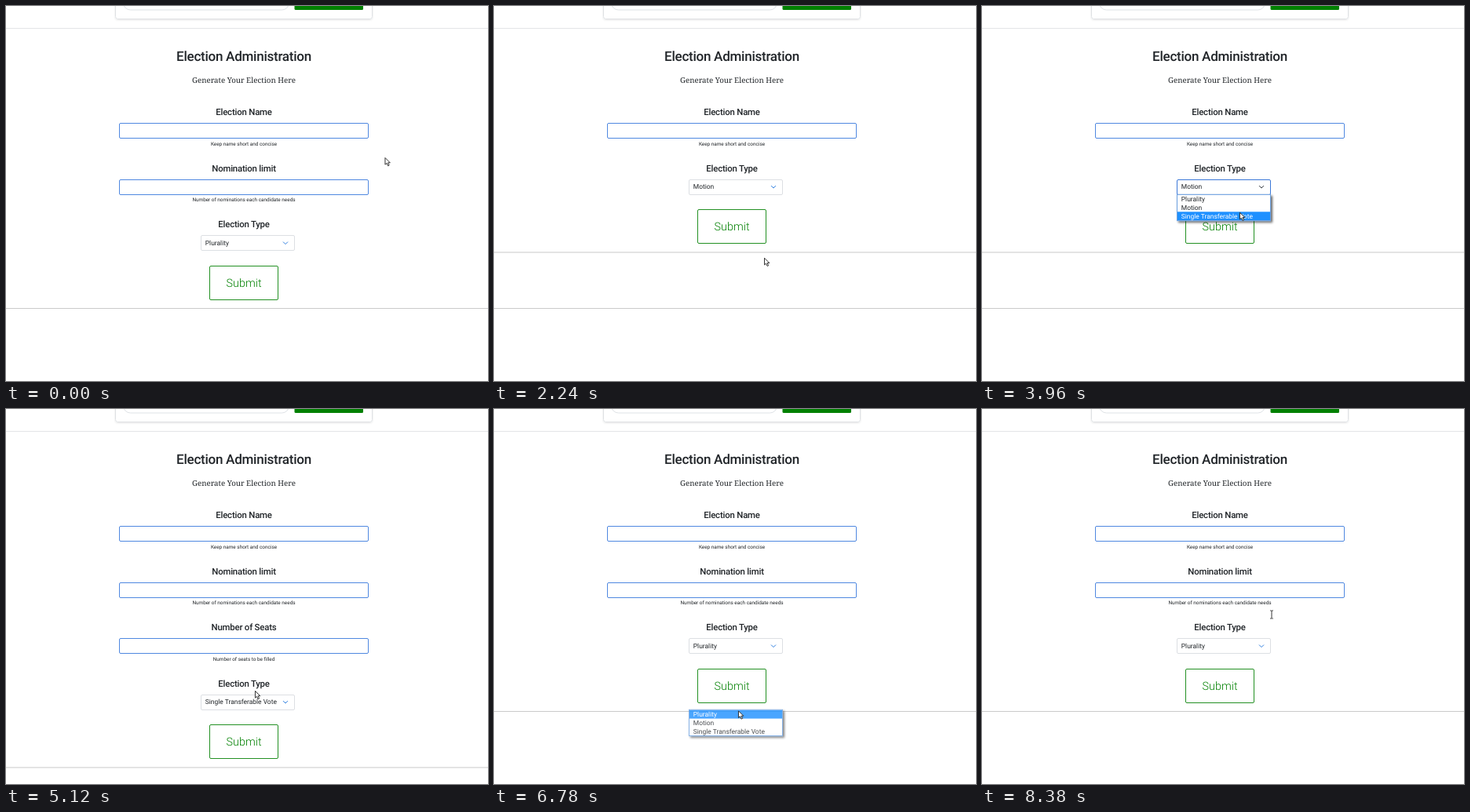
These frames come from a looping animation (614x478 px, 8400 ms). An HTML page:

```html
<!DOCTYPE html>
<html lang="en">
<head>
<meta charset="utf-8">
<title>Election Administration</title>
<style>
  html, body { margin: 0; width: 100%; height: 100%; overflow: hidden; background: #fff; }
  svg { display: block; width: 614px; height: 478px; }
  text { font-family: Roboto, sans-serif; fill: #212529; text-anchor: middle; text-rendering: geometricPrecision; }
  .title { font-size: 17.1px; font-weight: 500; letter-spacing: -.3px; }
  .lead { font: 9.75px "Noto Serif", serif; }
  .label { font-size: 11.4px; font-weight: 500; letter-spacing: -.2px; }
  .help { font-size: 6.4px; }
  .option { font-size: 8.45px; text-anchor: start; }
  .submit { font-size: 14.4px; font-weight: 300; }
  .box { fill: #fff; stroke: #4f88e0; }
  .cursor { fill: #fff; stroke: #222; stroke-linejoin: round; }
</style>
</head>
<body>
<svg id="stage" viewBox="0 0 614 478"></svg>
<script>
const LOOP = 8400, MID = 303, STEP = 71.5, ROW = 10.7, FADE = 160;
const TYPES = ['Plurality', 'Motion', 'Single Transferable Vote'];
const FIELDS = [
  ['Election Name', 'Keep name short and concise'],
  ['Nomination limit', 'Number of nominations each candidate needs'],
  ['Number of Seats', 'Number of seats to be filled']
];
const FIELD_COUNT = [2, 1, 3];

// Each round: go to the select, open it, pick the next type, then rest
const FIRST_STOP = [356, 278];
const ROUNDS = [
  { start: 1140, rest: [330, 279] },
  { start: 3060, rest: [317, 359] },
  { start: 5800, rest: [369, 262] }
].map(({ start, rest }, type) => ({
  type, start, rest, next: (type + 1) % 3, open: start + 450, pick: start + 920
}));

const stage = document.getElementById('stage');
const clamp = (v, a, b) => Math.max(a, Math.min(b, v));
const snap = v => Math.floor(v) + .5;
const selectY = type => 158.8 + FIELD_COUNT[type] * STEP;
const fieldY = i => 159 + i * STEP;
const typeAt = t => ROUNDS.reduce((type, r) => t >= r.pick ? r.next : type, 0);

const rect = (x, y, w, h, attrs = '') => `<rect x="${x}" y="${y}" width="${w}" height="${h}" ${attrs}/>`;
const text = (cls, x, y, str, attrs = '') => `<text class="${cls}" x="${x}" y="${y}" ${attrs}>${str}</text>`;
const rule = (y, color) => rect(0, y, 614, 1, `fill="${color}"`);

function pointerAt(t) {
  if (t < 80) return [482.5, 193];
  if (t < 360) return null;
  let at = FIRST_STOP;
  const move = (from, to, stop) => {
    const p = clamp((t - from) / (to - from), 0, 1), e = p * p * (3 - 2 * p);
    at = at.map((v, i) => v + (stop[i] - v) * e);
  };
  for (const r of ROUNDS) {
    const x = 345 - 17 * r.type, y = selectY(r.type);
    move(r.start, r.start + 300, [x, y - 5]);
    move(r.open, r.open + 370, [x, y + 10 + (r.next + .1) * ROW]);
    move(r.pick + 80, r.pick + 740, r.rest);
  }
  return at;
}

function targetAt(t) {
  const at = pointerAt(t);
  if (!at || ROUNDS.some(r => t >= r.open && t < r.pick + 40)) return '';
  const [x, y] = at, type = typeAt(t), c = selectY(type);
  const within = (halfW, top, bottom) => Math.abs(x - MID) < halfW && y > top && y < bottom;
  if (within(60, c - 9, c + 9)) return 'select';
  if (within(44, c + 29, c + 73)) return 'submit';
  const onField = FIELDS.slice(0, FIELD_COUNT[type]).some((f, i) => within(158, fieldY(i) - 10, fieldY(i) + 35));
  return onField ? 'text' : '';
}

function submitFill(t) {
  let n = 0;
  for (let k = 0; k < 10; k++) n += targetAt(t - k * 15) === 'submit';
  return n / 10;
}

function header() {
  return rect(139.5, -20, 327, 36.5, 'rx="3" fill="#fff" stroke="#dfe1e4" filter="url(#soft)"') +
    rect(149.5, -16, 211, 21, 'rx="9" fill="#fff" stroke="#dee2e6"') +
    rect(367.5, -20, 87.5, 25, 'rx="1.5" fill="#008000"') +
    rule(28, '#e3e5e7') +
    text('title', MID, 69.6, 'Election Administration') +
    text('lead', MID, 98.4, 'Generate Your Election Here');
}

function field([label, help], i) {
  const y = fieldY(i);
  return text('label', MID, y - 19.7, label) +
    rect(144.5, snap(y - 9.5), 317, 19, 'rx="1.5" class="box"') +
    text('help', MID, y + 18.8, help);
}

function select(c, type, hover, open) {
  const border = open ? '#3b78d8' : hover ? '#a5a8ac' : '#dcdfe3';
  const arrow = open || hover ? '#343a40' : '#2f7fe0';
  return text('label', MID, c - 19.6, 'Election Type') +
    rect(248.5, snap(c - 9.2), 119, 19, `rx="1.5" fill="#fff" stroke="${border}"`) +
    text('option', 253.8, c + 2.9, TYPES[type]) +
    `<path d="M353 ${c - 1.2}l3 3 3-3" fill="none" stroke="${arrow}"/>`;
}

function submit(c, fill) {
  const mix = (a, b) => Math.round(a + (b - a) * fill);
  return rect(259.5, snap(c - 21.5), 87, 43, `rx="1.5" stroke="#239023" fill="rgb(${mix(255, 0)},${mix(255, 128)},${mix(255, 0)})"`) +
    text('submit', MID, c + 5.2, 'Submit', `style="fill:rgb(${mix(0, 255)},${mix(128, 255)},${mix(0, 255)})"`);
}

function menu({ type, pick }, t, pointer) {
  const top = selectY(type) + 10, y = pointer[1];
  const active = y < top ? type : clamp(Math.floor((y - top) / ROW), 0, 2);
  const rows = TYPES.map((name, i) => {
    const ry = top + .6 + i * ROW, on = i === active;
    return (on ? rect(249, ry, 118, ROW, 'fill="#1e90ff"') : '') +
      text('option', 253.8, ry + 8.2, name, on ? 'style="fill:#fff"' : '');
  });
  return `<g opacity="${clamp(1 - (t - pick) / FADE / 2, 0, 1)}">` +
    rect(248.5, top, 119, 3 * ROW + 1.2, 'fill="#fff" stroke="#6b9fe0" filter="url(#drop)"') +
    rows.join('') + '</g>';
}

function cursor([x, y], target) {
  const shape = {
    text: 'M-2-5.5h1.5l.5.6.5-.6H2M0-5V5M-2 5.5h1.5L0 5l.5.5H2',
    hand: 'M-1.2 5V.8q0-1 1-1t1 1v2.7l4 .7q1 .3.9 1.3l-.4 3.2H-1.8l-2-2.8q-.5-1.3.8-1.2z',
    arrow: 'M.5.5V10l2.2-2 1.7 3.7 1.7-.8-1.7-3.5h3z'
  };
  const kind = target === 'text' ? 'text' : target ? 'hand' : 'arrow';
  return `<path class="cursor" transform="translate(${x} ${y}) scale(.92)" d="${shape[kind]}"/>`;
}

function draw(t) {
  const type = typeAt(t), c = selectY(type), pointer = pointerAt(t), target = targetAt(t);
  const round = ROUNDS.find(r => t >= r.open && t < r.pick + FADE);
  let out = `<defs>
    <filter id="soft" x="-10%" y="-50%" width="120%" height="200%"><feDropShadow dx="0" dy="1" stdDeviation="1" flood-opacity=".1"/></filter>
    <filter id="drop" x="-10%" y="-30%" width="120%" height="160%"><feDropShadow dx="2" dy="2" stdDeviation="1.5" flood-opacity=".6"/></filter>
  </defs>` + header();
  out += FIELDS.slice(0, FIELD_COUNT[type]).map(field).join('');
  out += select(c, type, target === 'select', round && t < round.pick);
  out += submit(c + 50.8, submitFill(t));
  out += rule(c + 83.2, '#cacaca');
  if (type === 1) out += rule(selectY(0) + 83.2, '#cacaca');
  if (round) out += menu(round, t, pointer);
  if (pointer) out += cursor(pointer, target);
  stage.innerHTML = out;
}

function frame(now) {
  draw(now % LOOP);
  requestAnimationFrame(frame);
}
draw(0);
requestAnimationFrame(frame);
</script>
</body>
</html>
```
